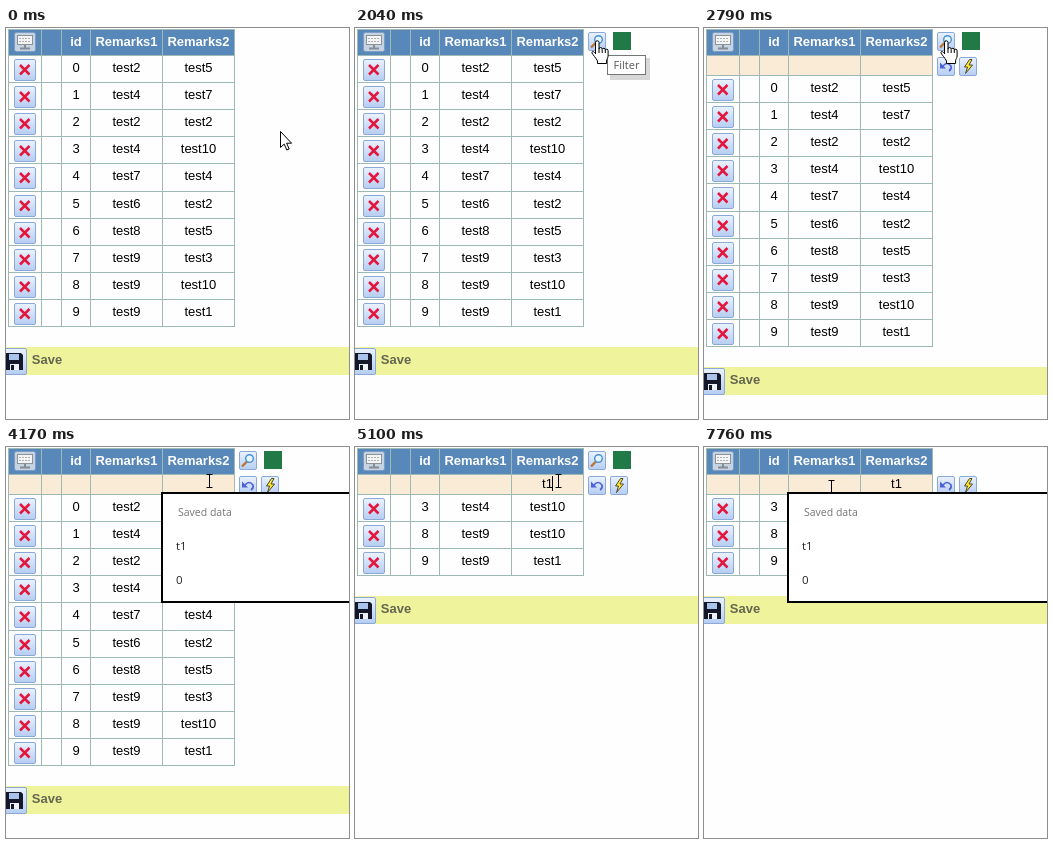
An HTML page for the animation above (8 s loop, 343x391 px).

```html
<!DOCTYPE html>
<html lang="en">
<head>
<meta charset="utf-8">
<title>Table filter</title>
<style>
html, body { margin: 0; width: 100%; height: 100%; overflow: hidden; background: #fefefe; }
svg { display: block; }
text { font: 13px "Liberation Sans", Arial, sans-serif; text-anchor: middle; fill: #000; }
.bold { font-weight: bold; }
.menu text { font: 11.5px "Open Sans", sans-serif; text-anchor: start; fill: #222; }
.menu .title { font-size: 10.5px; fill: #757575; }
.tip text { font: 11px "Open Sans", sans-serif; fill: #575757; }
.line { fill: none; stroke: #9db9b5; }
.btn { fill: url(#face); stroke: #8aa9d6; }

/* Every track is a set of hard changes on one 8 s clock. */
[class] { animation: none 8s step-end infinite; }
.tools, .tip, .filter, .t, .t1, .caret, .hand, .beam, .m1, .m2, .m3 { visibility: hidden; }

.tools { animation-name: tools; }
@keyframes tools { 8.225% { visibility: visible } 68% { visibility: hidden } }
.tip { animation-name: tip; }
@keyframes tip { 25.5% { visibility: visible } 31.75% { visibility: hidden } }
.filter { animation-name: filter; }
@keyframes filter { 34.875% { visibility: visible } }
.body { animation-name: body; }
@keyframes body { 34.875% { transform: translateY(20px) } }
.bar { animation-name: bar; }
@keyframes bar { 34.875% { transform: translateY(20px) } 63.75% { transform: translateY(-170px) } }
.drop { animation-name: drop; }
@keyframes drop { 63.75% { visibility: hidden } }
.keep { transform: translateY(var(--from)); animation-name: keep; }
@keyframes keep { 63.75% { transform: translateY(var(--to)) } }

.t { animation-name: t; }
@keyframes t { 61% { visibility: visible } 63.75% { visibility: hidden } }
.t1 { animation-name: t1; }
@keyframes t1 { 63.75% { visibility: visible } }
.caret { animation-name: caret; }
@keyframes caret {
  46.125% { visibility: visible; transform: translateX(192px) }
  52.125% { visibility: hidden; transform: translateX(192px) }
  59.25% { visibility: visible; transform: translateX(192px) }
  61% { visibility: visible; transform: translateX(194px) }
  63.75% { visibility: visible; transform: translateX(197px) }
  69.875% { visibility: hidden; transform: translateX(197px) }
  76.75% { visibility: visible; transform: translateX(197px) }
  83.375% { visibility: hidden; transform: translateX(120px) }
  90.375% { visibility: visible; transform: translateX(120px) }
  97% { visibility: hidden; transform: translateX(120px) }
}

.m1 { animation-name: m1; }
@keyframes m1 {
  46.125% { visibility: visible; opacity: .5 }
  47.25% { visibility: visible; opacity: 1 }
  61.75% { visibility: hidden }
}
.m2 { animation-name: m2; }
@keyframes m2 { 61.75% { visibility: visible } 63.75% { visibility: hidden } }
.m3 { animation-name: m3; }
@keyframes m3 {
  90.375% { visibility: visible; opacity: .5 }
  91.125% { visibility: visible; opacity: 1 }
}

.mouse { transform: translate(274px, 103px); animation-name: mouse; }
@keyframes mouse {
  5.75% { transform: translate(268px, 93px) }
  6.575% { transform: translate(252px, 70px) }
  7.4% { transform: translate(236px, 50px) }
  8.225% { transform: translate(222px, 34px) }
  9.05% { transform: translate(210px, 23px) }
  9.875% { transform: translate(205px, 19px) }
  16.375% { transform: translate(216px, 18px) }
  17.5% { transform: translate(225px, 16px) }
  18.5% { transform: translate(231px, 14px) }
  19.5% { transform: translate(239px, 13px) }
  20.375% { transform: translate(242px, 12px) }
  41.5% { transform: translate(232px, 16px) }
  42.25% { transform: translate(222px, 20px) }
  43% { transform: translate(211px, 32px) }
  43.875% { transform: translate(203px, 34px) }
  80.625% { transform: translate(184px, 35px) }
  81.5% { transform: translate(158px, 37px) }
  82.375% { transform: translate(136px, 39px) }
  83.375% { transform: translate(127px, 40px) }
}
.arrow { animation-name: arrow; }
@keyframes arrow {
  19.5% { visibility: hidden }
  41.5% { visibility: visible }
  43% { visibility: hidden }
}
.hand { animation-name: hand; }
@keyframes hand { 19.5% { visibility: visible } 41.5% { visibility: hidden } }
.beam { animation-name: beam; }
@keyframes beam { 43% { visibility: visible } }
</style>
</head>
<body>
<svg id="stage" width="343" height="391" viewBox="0 0 343 391"></svg>
<script>
const cols = [2.5, 35.5, 55.5, 84.5, 156.5, 228.5];
const data = [[2, 5], [4, 7], [2, 2], [4, 10], [7, 4], [6, 2], [8, 5], [9, 3], [9, 10], [9, 1]];
const matches = [3, 8, 9];

const top_ = i => Math.round(i * 27.1);
const text = (x, y, s, cls = '') => `<text x="${x}" y="${y}"${cls && ` class="${cls}"`}>${s}</text>`;
const button = (x, y, w, h) =>
  `<rect class="btn" x="${x + .5}" y="${y + .5}" width="${w - 1}" height="${h - 1}" rx="1.5"/>`;
const grid = (y, h) =>
  `<path class="line" d="${cols.map(x => `M${x} ${y}v${h}`).join('')}M2 ${y + h}H229"/>`;

function row([a, b], i) {
  const slot = matches.indexOf(i);
  const look = slot < 0
    ? `class="drop" transform="translate(0 ${top_(i)})"`
    : `class="keep" style="--from:${top_(i)}px;--to:${top_(slot)}px"`;
  return `<g ${look}>
    ${grid(27.5, top_(i + 1) - top_(i))}
    ${button(8, 31, 22, 22)}
    <path d="M14 37l9.5 9.5M23.5 37l-9.5 9.5" stroke="#e3173e" stroke-width="2.5"/>
    ${text(70, 44, i)}${text(120.5, 44, 'test' + a)}${text(192.5, 44, 'test' + b)}
  </g>`;
}

const header = `
  <rect x="2" y="1" width="227" height="27" fill="#5888b9"/>
  ${grid(1.5, 26)}<path class="line" d="M2 1.5H229"/>
  <rect x="8.5" y="4.5" width="21" height="19" rx="2" fill="#c6d3e2" stroke="#7d9dc4"/>
  <rect x="11.5" y="7.5" width="15" height="9" fill="#f4f4f2" stroke="#8c9399"/>
  <path d="M13 10.5h12M13 13.5h12" stroke="#a9afb4" stroke-dasharray="2 1"/>
  <path d="M19 17v3M14 20.5h10" stroke="#858c92" stroke-width="2"/>
  ${text(70, 18, 'id', 'bold head')}${text(120.5, 18, 'Remarks1', 'bold head')}
  ${text(192.5, 18, 'Remarks2', 'bold head')}`;

const tools = `<g class="tools">
  ${button(233, 4, 18, 19)}
  <path d="M241 14.5l-5 5" stroke="#b8763a" stroke-width="2.4"/>
  <circle cx="243.5" cy="11.5" r="3.8" fill="#e4f6ff" stroke="#4a8fd0" stroke-width="1.4"/>
  <rect x="258" y="4" width="18" height="18" fill="#217a46"/>
</g>`;

const filter = `<g class="filter">
  <rect x="2" y="28" width="227" height="19" fill="#faebd7"/>
  ${grid(27.5, 20)}
  ${button(233, 29, 18, 19)}
  <path d="M239 38q4-5 8 0q1 3-2 5" fill="none" stroke="#4d62d6" stroke-width="1.6"/>
  <path d="M236 34.5v6h6z" fill="#4d62d6"/>
  ${button(255, 29, 18, 19)}
  <path d="M265.5 31.5l-5 7.5h3l-2 6.5 7-8.5h-3.5l3-5.5z" fill="#ffe62e" stroke="#4c4a36"/>
</g>
${text(192.5, 41, 't', 't')}${text(192.5, 41, 't1', 't1')}
<path class="caret" d="M.5 29v15" stroke="#000"/>`;

const bar = `<g class="bar">
  <rect y="319" width="343" height="28" fill="#eff39b"/>
  ${button(-4, 320, 25, 27)}
  <path d="M0 325h15l2 2v15H0z" fill="#14182a"/>
  <path d="M3 326h10v6H3z" fill="#a9c3ea"/>
  <path d="M4 336h9v6H4z" fill="#eef2f8"/>
  <path d="M5 337h3v5H5z" fill="#14182a"/>
  ${text(41, 336, 'Save', 'bold save')}
</g>`;

const menu = (cls, x, items) => `<g class="${cls}"><g class="menu">
  <rect x="${x + 1}" y="46" width="300" height="${41 + 34 * items.length}" fill="#fff" stroke="#000" stroke-width="2"/>
  ${text(x + 17, 69, 'Saved data', 'title')}
  ${items.map((s, i) => text(x + 15, 103 + 34 * i, s)).join('')}
</g></g>`;

const tip = `<g class="tip">
  <rect x="255" y="30" width="40" height="22" fill="#000" opacity=".15"/>
  <rect x="252.5" y="27.5" width="38" height="19" fill="#fff" stroke="#767676"/>
  ${text(271.5, 41, 'Filter')}
</g>`;

const mouse = `<g class="mouse">
  <path class="arrow" d="M.5.5v16l3.7-3.4 2.6 5.9 2.4-1-2.6-5.8h5z" fill="#fff" stroke="#000"/>
  <g class="hand" fill="#fff" stroke="#000">
    <path d="M-1.5 14V2.5a1.75 1.75 0 0 1 3.5 0V9a1.6 1.6 0 0 1 3.2.3 1.6 1.6 0 0 1 3.1.6 1.5 1.5 0 0 1 2.8.9V16c0 2-1.5 3-1.5 5v2.5H.5V21c-1.500-3-4.500-6-5.500-8-.5-1.800 1.500-2.300 3.500.5z"/>
    <path d="M2 9v4M5.200 9.500v3.500M8.300 10v3" fill="none"/>
  </g>
  <path class="beam" d="M-2.500-6.500h6M-2.500 6.500h6M.5-6.500v13" fill="none" stroke="#000"/>
</g>`;

document.getElementById('stage').innerHTML = `
  <defs><linearGradient id="face" x2="0" y2="1">
    <stop stop-color="#eaf2fe"/><stop offset="1" stop-color="#b6cdf2"/>
  </linearGradient></defs>
  <style>.head { fill: #fff } .save { fill: #64664f }</style>
  ${header}
  <g class="body">${data.map(row).join('')}</g>
  ${tools}${filter}${bar}
  ${menu('m1', 155, ['t1', '0'])}${menu('m2', 155, ['t1'])}${menu('m3', 83, ['t1', '0'])}
  ${tip}${mouse}`;
</script>
</body>
</html>
```
